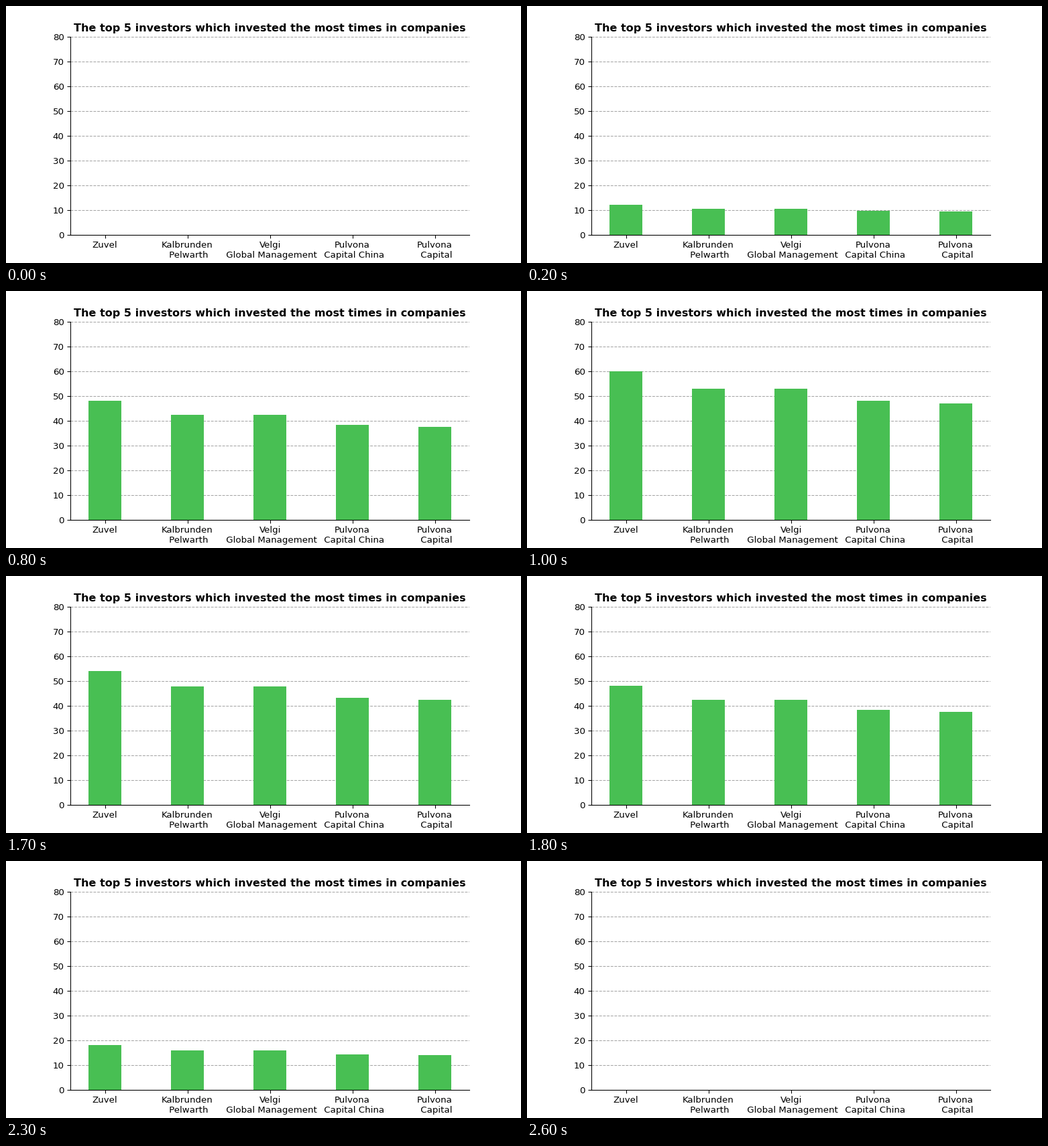
These frames come from a looping animation (768 by 384 pixels, 3200 ms). A matplotlib script:

```python
import matplotlib.pyplot as plt
from matplotlib.animation import FuncAnimation

STEP_MS = 100
FRAMES = 32
RISE_END = 10    # bars reach full height
FALL_START = 16  # bars begin to shrink
STEPS = 10

names = [
    "Zuvel",
    "Kalbrunden\n Pelwarth",
    "Velgi\n Global Management",
    "Pulvona\n Capital China",
    "Pulvona\n Capital",
]
counts = [60, 53, 53, 48, 47]

plt.rcParams["font.family"] = "DejaVu Sans"
fig, ax = plt.subplots(figsize=(8, 4), dpi=96)

bars = ax.bar(range(len(counts)), counts, width=0.4, color="#48bf53", zorder=2)
ax.set_xticks(range(len(names)), names)
ax.set_ylim(0, 80)
ax.set_yticks(range(0, 81, 10))
ax.set_title("The top 5 investors which invested the most times in companies",
             fontweight="bold")
ax.set_axisbelow(True)
ax.grid(axis="y", color="gray", linestyle="dashed", alpha=0.7)
ax.spines[["top", "right"]].set_visible(False)


def level(frame):
    """Share of full height: linear rise, hold, linear fall, rest."""
    if frame <= FALL_START:
        return min(frame, RISE_END) / STEPS
    return max(FALL_START + STEPS - frame, 0) / STEPS


def update(frame):
    share = level(frame)
    for bar, count in zip(bars, counts):
        bar.set_height(count * share)
        bar.set_visible(share > 0)
    return list(bars)


anim = FuncAnimation(fig, update, frames=FRAMES, interval=STEP_MS,
                     init_func=lambda: update(0), repeat=True, repeat_delay=0)
plt.show()
```
